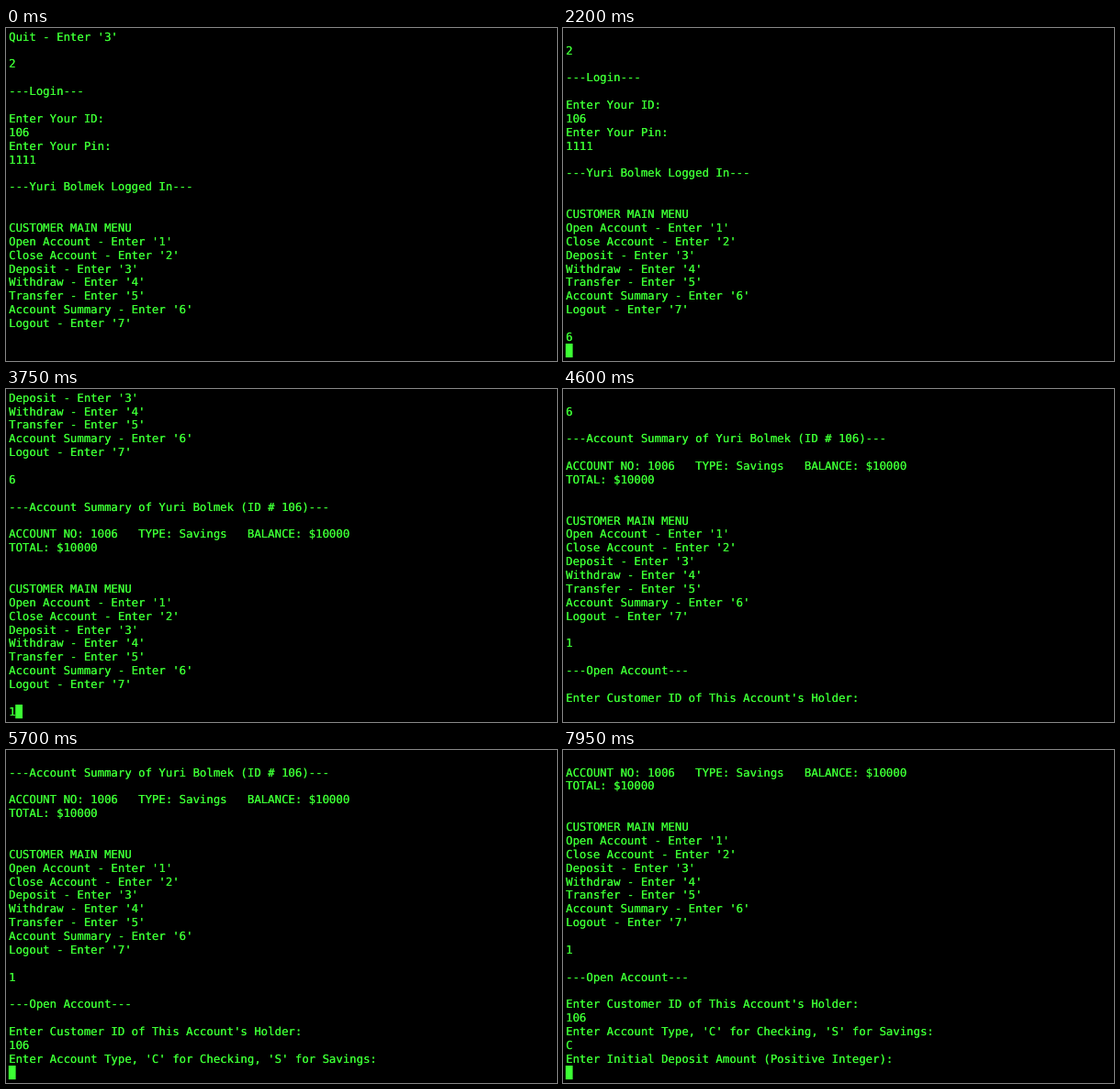
An HTML page for the animation above (8 s loop, 600x363 px).

```html
<!DOCTYPE html>
<html lang="en">
<head>
<meta charset="utf-8">
<title>Terminal session</title>
<style>
  html, body { margin: 0; width: 100%; height: 100%; overflow: hidden; background: #000; }
  svg { display: block; width: 100%; height: 100%; }
  text {
    font: 12.33px "DejaVu Sans Mono", monospace;
    fill: #3cff34;
    text-shadow: 0.25px 0 0 #3cff34;
    white-space: pre;
    text-rendering: geometricPrecision;
  }
</style>
</head>
<body>
<svg viewBox="0 0 600 363">
  <rect width="600" height="363" fill="#000"/>
  <g id="rows"></g>
  <rect id="cursor" width="7.8" height="15.1" fill="#3cff34"/>
</svg>
<script>
const LOOP = 8000, ROWS = 24, LEFT = 3, TOP = 2, PITCH = 14.88, ADVANCE = 7.423, ASCENT = 11.65;
const USER = 'Yuri Bolmek';

const menu = ['', '', 'CUSTOMER MAIN MENU',
  ...['Open Account', 'Close Account', 'Deposit', 'Withdraw', 'Transfer', 'Account Summary', 'Logout']
    .map((name, i) => `${name} - Enter '${i + 1}'`), ''];

const intro = ["Quit - Enter '3'", '', '2', '', '---Login---', '',
  'Enter Your ID:', '106', 'Enter Your Pin:', '1111', '',
  `---${USER} Logged In---`, ...menu];

const summary = ['', `---Account Summary of ${USER} (ID # 106)---`, '',
  'ACCOUNT NO: 1006   TYPE: Savings   BALANCE: $10000', 'TOTAL: $10000', ...menu];

// Each step: [time, action, argument]
const session = [
  [100, 'blink', true], [600, 'blink', false], [1100, 'blink', true], [1600, 'blink', false],
  [1800, 'type', '6'], [2200, 'enter'], [2250, 'print', summary],
  [3500, 'type', '1'], [3900, 'enter'],
  [3950, 'print', ['', '---Open Account---', '', "Enter Customer ID of This Account's Holder:"]],
  [4600, 'blink', false],
  [4900, 'type', '1'], [5150, 'type', '0'], [5400, 'type', '6'], [5600, 'enter'],
  [5650, 'print', ["Enter Account Type, 'C' for Checking, 'S' for Savings:"]],
  [6100, 'blink', false], [6600, 'blink', true], [7100, 'blink', false],
  [7450, 'type', 'C'], [7800, 'enter'],
  [7850, 'print', ['Enter Initial Deposit Amount (Positive Integer):']],
];

const actions = {
  blink(s, on) { s.on = on; },
  type(s, key) { s.input += key; s.on = true; },
  enter(s) { s.lines.push(s.input); s.input = ''; s.on = true; },
  print(s, lines) { s.lines.push(...lines); },
};

function stateAt(t) {
  const s = { lines: [...intro], input: '', on: false };
  for (const [time, action, arg] of session) {
    if (time > t) break;
    actions[action](s, arg);
  }
  return s;
}

const rowGroup = document.getElementById('rows');
const cursor = document.getElementById('cursor');
const rows = Array.from({ length: ROWS }, (_, i) => {
  const row = document.createElementNS('http://www.w3.org/2000/svg', 'text');
  row.setAttribute('x', LEFT);
  row.setAttribute('y', TOP + ASCENT + i * PITCH);
  return rowGroup.appendChild(row);
});
cursor.setAttribute('y', TOP + (ROWS - 1) * PITCH - 0.2);

function render(t) {
  const { lines, input, on } = stateAt(t);
  const view = [...lines, input].slice(-ROWS);
  rows.forEach((row, i) => {
    if (row.textContent !== view[i]) row.textContent = view[i];
  });
  cursor.setAttribute('x', LEFT + input.length * ADVANCE - 0.2);
  cursor.setAttribute('visibility', on ? 'visible' : 'hidden');
}

const start = performance.now();
function tick() {
  render((performance.now() - start) % LOOP);
  requestAnimationFrame(tick);
}
tick();
</script>
</body>
</html>
```
